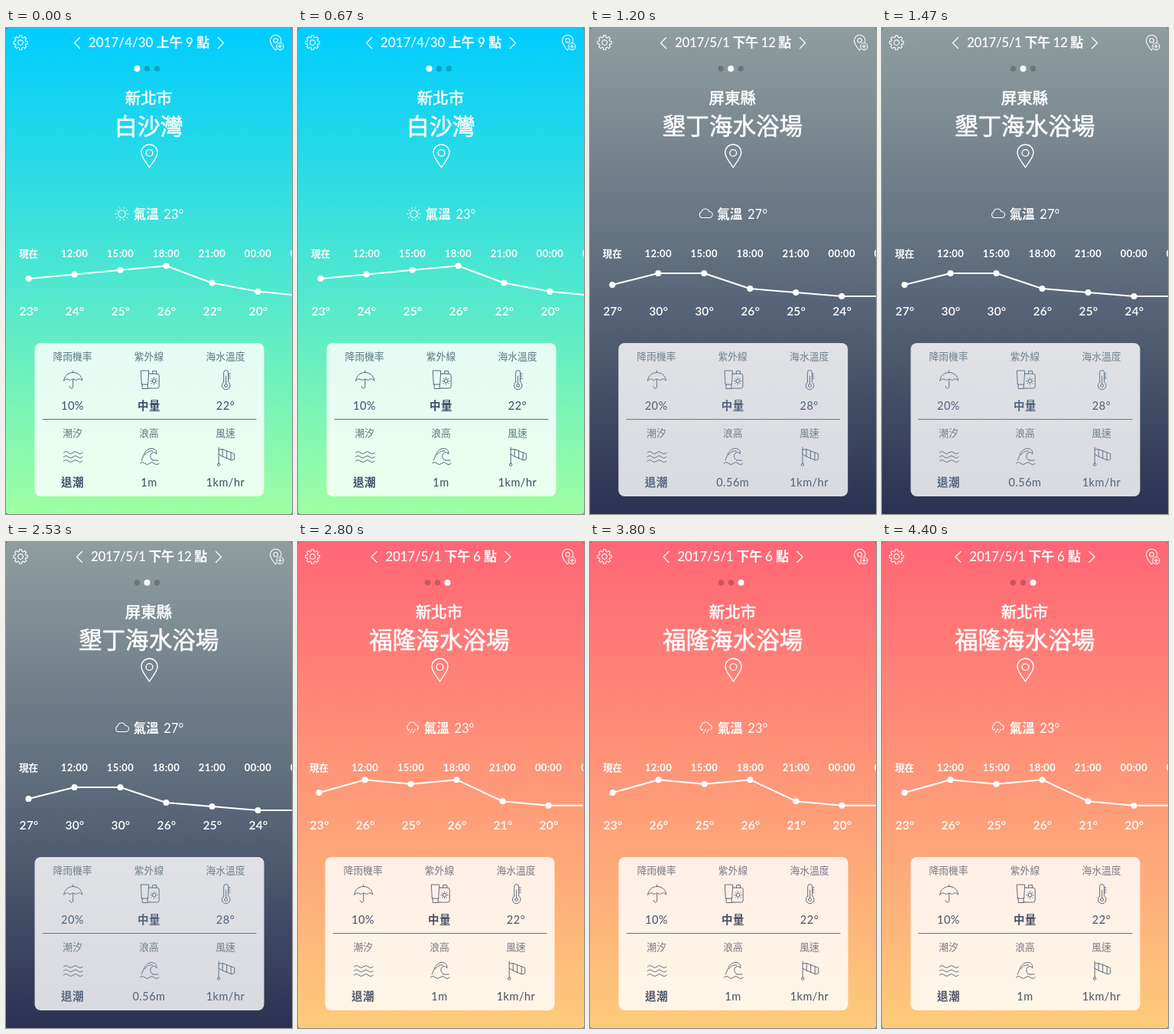
Write an HTML page that moves like this. It is 374x634 px and loops after 4.47 s.

```html
<!DOCTYPE html>
<html lang="zh-TW">
<head>
<meta charset="utf-8">
<title>海邊天氣</title>
<style>
html, body { margin: 0; width: 100%; height: 100%; overflow: hidden; background: #555; }
svg { display: block; width: 100vw; height: 100vh; font-family: Lato, "Noto Sans CJK TC", "Noto Sans CJK", sans-serif; }
text { text-anchor: middle; fill: #fff; }
.place { stroke: #fff; stroke-width: .55; }
.line { fill: none; stroke: #fff; stroke-linecap: round; stroke-linejoin: round; }
.icon { fill: none; stroke-width: 1; opacity: .85; stroke-linecap: round; stroke-linejoin: round; }
</style>
</head>
<body>
<svg id="stage" viewBox="0 0 374 634" preserveAspectRatio="none"></svg>
<script>
const LOOP = 4470, STEP = 375;
const SWIPES = [1008, 2570];
const HOURS = ['現在', '12:00', '15:00', '18:00', '21:00', '00:00', '03:00'];
const LABELS = ['降雨機率', '紫外線', '海水溫度', '潮汐', '浪高', '風速'];
const PAGES = [
  { sky: ['#00ccff', '#4be6d2', '#9fffa2'], date: '2017/4/30 上午 9 點', half: 80, track: 0,
    city: '新北市', beach: '白沙灣', size: 30, weather: 'sun', temps: [23, 24, 25, 26, 22, 20, 19],
    base: 327, scale: 5.6, values: ['10%', '中量', '22°', '退潮', '1m', '1km/hr'],
    label: '#5c7880', value: '#3c4c68' },
  { sky: ['#909d9f', '#5f6c7c', '#2b3152'], date: '2017/5/1 下午 12 點', half: 77, track: -.4,
    city: '屏東縣', beach: '墾丁海水浴場', size: 30.6, weather: 'cloud', temps: [27, 30, 30, 26, 25, 24, 24],
    base: 335, scale: 5, values: ['20%', '中量', '28°', '退潮', '0.56m', '1km/hr'],
    label: '#71808b', value: '#52637a' },
  { sky: ['#ff6676', '#fe9878', '#fdcb7b'], date: '2017/5/1 下午 6 點', half: 73.5, track: -.2,
    city: '新北市', beach: '福隆海水浴場', size: 30.6, weather: 'rain', temps: [23, 26, 25, 26, 21, 20, 20],
    base: 327, scale: 5.6, values: ['10%', '中量', '22°', '退潮', '1m', '1km/hr'],
    label: '#7c7984', value: '#4c5267' }
];

const text = (x, y, s, size, weight = 400, extra = '') =>
  `<text x="${x}" y="${y}" font-size="${size}" font-weight="${weight}" ${extra}>${s}</text>`;
const boldHan = s => s.replace(/[\u4e00-\u9fff]+/g, '<tspan font-weight="700">$&</tspan>');
const line = (d, w = 1.05) => `<path class="line" d="${d}" stroke-width="${w}"/>`;
const ring = (x, y, r, w = 1.05) => `<circle class="line" cx="${x}" cy="${y}" r="${r}" stroke-width="${w}"/>`;
const polar = (r, a) => `${(r * Math.cos(a)).toFixed(2)} ${(r * Math.sin(a)).toFixed(2)}`;

function rays(n, r1, r2) {
  let d = '';
  for (let i = 0; i < n; i++) {
    const a = i * 2 * Math.PI / n;
    d += `M${polar(r1, a)}L${polar(r2, a)}`;
  }
  return d;
}

function gear() {
  let d = '';
  for (let i = 0; i < 8; i++) {
    const a = i * Math.PI / 4;
    [[7, -.27], [9.3, -.18], [9.3, .18], [7, .27]].forEach(([r, o]) => {
      d += (d ? 'L' : 'M') + polar(r, a + o);
    });
  }
  return `<g transform="translate(19 19)">${line(d + 'Z')}${ring(0, 0, 3.4)}</g>`;
}

const wave = y => `M-12.4 ${y}q3.1-3 6.2 0t6.2 0t6.2 0t6.2 0`;
const ICONS = [
  // umbrella
  'M-12 1C-11-6-6-9.5 0-9.5S11-6 12 1C9.5-1.8 6-1.8 4 1C2-1.5-2-1.5-4 1C-6-1.8-9.5-1.8-12 1ZM0-9.5V-12M0-.5V9C0 12-4.5 12-4.5 8.5',
  // sunscreen
  'M-11-12H-1L-2 6H-10ZM-9.5 6V11.5H-2.5V6M1-8H10Q12.5-8 12.5-5.5V8.5Q12.5 11 10 11H0M-1-8H1M4-8V-11.5H9V-8M-2.5 11H0' +
    'M3.5 1.5a2.3 2.3 0 1 0 4.6 0a2.3 2.3 0 1 0-4.6 0M5.8-3V-2M5.8 5V6M1.3 1.5H2.3M9.3 1.5H10.3M2.6-1.7l.7.7M8.3 4l.7.7M9-1.7l-.7.7M3.3 4l-.7.7',
  // thermometer
  'M-3 3V-9.5a3 3 0 0 1 6 0V3a5.3 5.3 0 1 1-6 0ZM0-5V5M-2 7.5a2 2 0 1 0 4 0a2 2 0 1 0-4 0M3-8H5.5M3-5H5.5M3-2H5.5',
  wave(-5) + wave(0.5) + wave(6),
  // breaker
  'M-10.500 5C-8 1-7-10 2.500-10.500C7.500-10.500 10-7 9-3C8-5.500 5.500-6 3.500-5C0-3 .5 3 4.500 5' +
    'M-6-2C-4-6 0-7.500 4-7.200' + 'M4.500 5H11.500' + wave(9),
  // windsock
  'M-9.5-12V9M-11.2 10.5a1.7 1.7 0 1 0 3.4 0a1.7 1.7 0 1 0-3.4 0M-9.5-9L-4.5-9.5L11-3.5V3.5L7.500 5L-4.5 0L-9.5-3M-4.5-9.5V0M1-7.3V2.3M6.500-5.2V4.600'
];

const PIN = 'M0 15C-4 8-10.5 2-10.5-4.5A10.5 10.5 0 0 1 10.5-4.5C10.5 2 4 8 0 15Z';
const CLOUD = 'M-5 5A4 4 0 0 1-5.5-2.5A5.2 5.2 0 0 1 4.5-3A4 4 0 0 1 5.5 5Z';
const WEATHER = {
  sun: ring(0, 0, 4.8) + line(rays(10, 7.5, 8.7)),
  cloud: line(CLOUD),
  rain: line('M-5.5 2.5A3.5 3.5 0 0 1-5.5-3.5A5.2 5.2 0 0 1 4.5-4A3.5 3.5 0 0 1 6 2.5M-4 1.5l-1 2M0 1.5l-1 2M4 1.5l-1 2M-2 4.5l-1 2M2 4.5l-1 2')
};

function chart(p) {
  const pts = p.temps.map((t, i) => [29.5 + 60 * i, p.base - (t - p.temps[0]) * p.scale]);
  return line('M' + pts.map(q => q.join(' ')).join('L'), 2) + pts.map(([x, y], i) =>
    `<circle cx="${x}" cy="${y}" r="4" fill="#fff"/>` +
    text(x, 298.5, HOURS[i], i ? 13 : 12.6, 700, i ? 'letter-spacing=".35"' : '') +
    text(x + .5, 375.3, p.temps[i] + '°', 15.5, 600, 'letter-spacing=".2"')).join('');
}

function card(p) {
  let s = '<rect x="37.5" y="411" width="300" height="200" rx="8" fill="#fff" opacity=".82"/>' +
    `<path d="M47.5 510.5H327.5" stroke="${p.value}" opacity=".8"/>`;
  LABELS.forEach((name, i) => {
    const x = 87 + 100 * (i % 3), y = i < 3 ? 0 : 100;
    s += text(x, 433 + y, name, 12.8, 400, `style="fill:${p.label}"`) +
      `<path class="icon" transform="translate(${x + .7} ${459 + y})" d="${ICONS[i]}" stroke="${p.value}"/>` +
      text(x, 498 + y, boldHan(p.values[i]), 14.5, 400, `style="fill:${p.value}" letter-spacing=".5"`);
  });
  return s;
}

const page = p => `<g class="page"><g clip-path="url(#frame)">
  ${[171.5, 184.5, 197.5].map(x => `<circle class="dot" cx="${x}" cy="53"/>`).join('')}
  ${text(186.5, 99, p.city, 20.5, 400, 'class="place"')}${text(186.7, 138.5, p.beach, p.size, 400, 'class="place"')}
  <g transform="translate(187.5 167)">${line(PIN, 1.4)}${ring(0, -4, 4.4, 1.4)}</g>
  <g transform="translate(151.5 242.5)">${WEATHER[p.weather]}</g>
  ${text(199.5, 249, boldHan(`氣溫 ${p.temps[0]}°`), 16.5, 400, 'word-spacing="2.5"')}
  ${chart(p)}${card(p)}</g></g>`;

const head = p => `<g class="head">
  ${text(187, 24.5, boldHan(p.date), 17, 500, `letter-spacing="${p.track}"`)}
  ${line(`M${190.5 - p.half - 14} 12.5l-7 7l7 7M${183.5 + p.half + 14} 12.5l7 7l-7 7`, 1.2)}</g>`;

const sky = (p, i) => `<linearGradient id="sky${i}" x1="0" y1="0" x2="0" y2="1">
  ${p.sky.map((c, k) => `<stop offset="${k / 2}" stop-color="${c}"/>`).join('')}</linearGradient>`;

const stage = document.getElementById('stage');
stage.innerHTML = `<defs>${PAGES.map(sky).join('')}
  <clipPath id="frame"><rect width="${STEP}" height="634"/></clipPath></defs>
  <rect id="back" width="374" height="634" rx="2.5"/>
  ${PAGES.map(page).join('')}${PAGES.map(head).join('')}${gear()}
  ${line('M349.5 25.5C347.5 22 345.5 19.5 345.5 16.5A7.2 7.2 0 0 1 359.9 16.5L359.5 18.3M349.5 25.5L352.5 29L353.5 27.5')}
  ${ring(352.7, 16.3, 2.7)}${ring(358.3, 24, 4.6)}${line('M355.8 24h5M358.3 21.5v5')}`;

const back = document.getElementById('back');
const all = c => [...stage.querySelectorAll(c)];
const pages = all('.page'), heads = all('.head'), dots = all('.dot');

// Slightly underdamped spring from 0 to 1, t in ms
function spring(t) {
  if (t <= 0) return 0;
  const a = .0228 * t, w = .01366 * t;
  return 1 - Math.exp(-a) * (Math.cos(w) + 1.667 * Math.sin(w));
}

function draw(t) {
  const parts = SWIPES.map(s => spring(t - s));
  const pos = parts[0] + parts[1];
  const now = parts.filter(v => v > .9).length;
  pages.forEach((g, i) => {
    g.setAttribute('transform', `translate(${((i - pos) * STEP).toFixed(2)} 0)`);
    g.style.display = Math.abs(i - pos) < 1 ? '' : 'none';
  });
  heads.forEach((g, i) => g.style.display = i === now ? '' : 'none');
  dots.forEach((d, i) => {
    const on = i % 3 === now;
    d.setAttribute('r', on ? 4 : 3.7);
    d.setAttribute('fill', on ? '#fff' : 'rgba(0,0,0,.21)');
  });
  back.setAttribute('fill', `url(#sky${now})`);
}

const start = performance.now();
function tick() {
  draw((performance.now() - start) % LOOP);
  requestAnimationFrame(tick);
}
tick();
</script>
</body>
</html>
```
